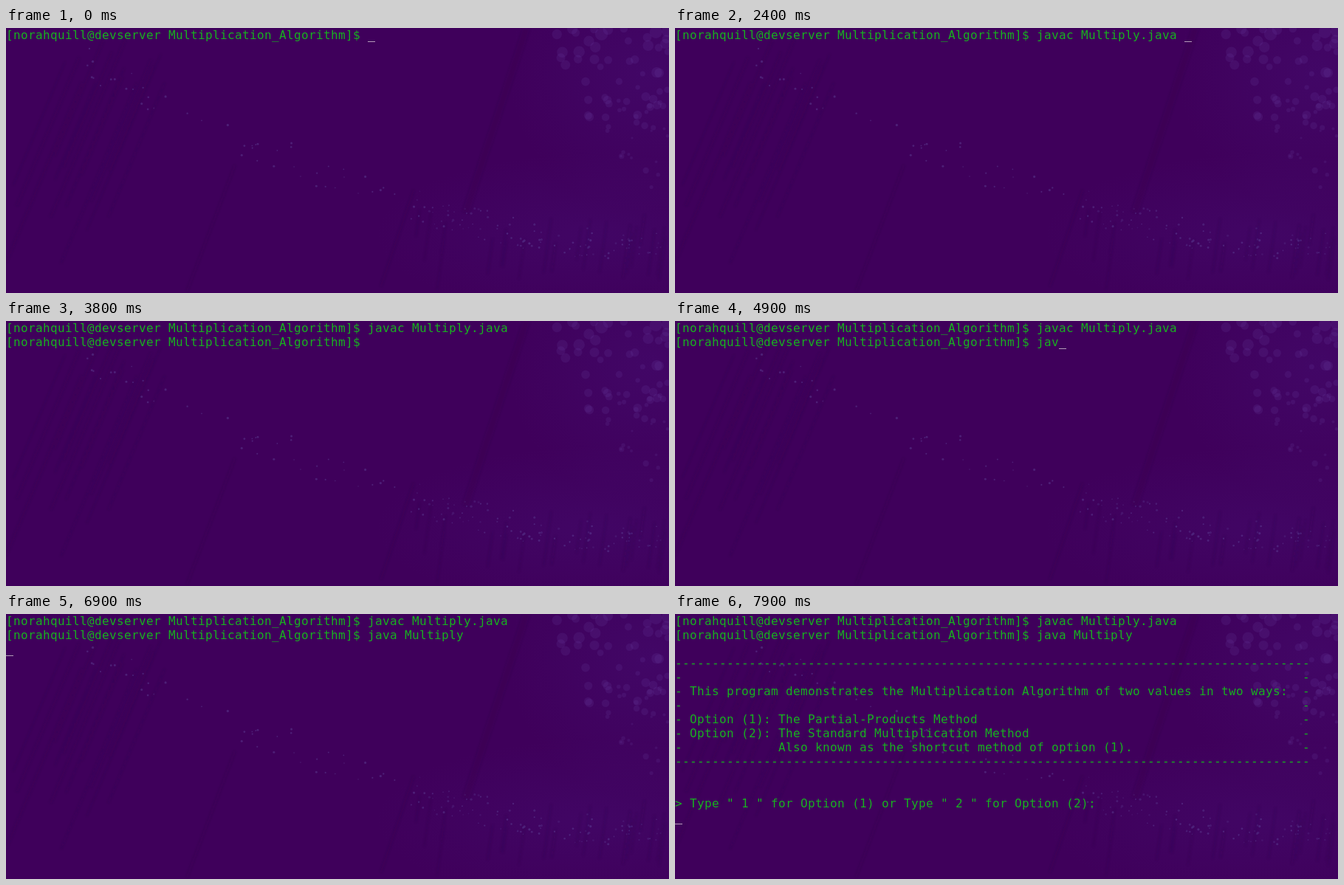
Write an HTML page that moves like this. It is 898 by 359 pixels and loops after 8 s.

```html
<!DOCTYPE html>
<html lang="en">
<head>
<meta charset="utf-8">
<title>Terminal session</title>
<style>
  html, body { margin: 0; width: 100%; height: 100%; overflow: hidden; background: #3f005b; }
  svg { display: block; width: 898px; height: 359px; }
  text { font: 16px "DejaVu Sans Mono", monospace; fill: #18b020; white-space: pre; }
</style>
</head>
<body>
<svg viewBox="0 0 898 359" xmlns="http://www.w3.org/2000/svg">
  <defs>
    <radialGradient id="glow">
      <stop offset="0" stop-color="#4c2090" stop-opacity=".3"/>
      <stop offset="1" stop-color="#4c2090" stop-opacity="0"/>
    </radialGradient>
    <filter id="soft" filterUnits="userSpaceOnUse" x="0" y="0" width="898" height="359">
      <feGaussianBlur stdDeviation="1.8"/>
    </filter>
    <filter id="edge" filterUnits="userSpaceOnUse" x="0" y="0" width="898" height="359">
      <feGaussianBlur stdDeviation=".7"/>
    </filter>
  </defs>
  <rect width="898" height="359" fill="#3f005b"/>
  <ellipse cx="870" cy="60" rx="190" ry="190" fill="url(#glow)" opacity=".7"/>
  <ellipse cx="800" cy="280" rx="300" ry="110" fill="url(#glow)" opacity=".6"/>
  <g id="streaks" filter="url(#soft)" stroke="#28003e"></g>
  <g id="bokeh" filter="url(#edge)" fill="#7a5cbc"></g>
  <g id="sparks" filter="url(#edge)" fill="#7068b8"></g>
  <g id="lines"></g>
  <rect id="cursor" width="10" height="1" fill="#b59cba"/>
</svg>
<script>
const NS = 'http://www.w3.org/2000/svg';
const $ = id => document.getElementById(id);
const COL = 10, ROW = 19, LOOP = 8000;

function add(parent, tag, attrs) {
  const el = document.createElementNS(NS, tag);
  for (const key in attrs) el.setAttribute(key, attrs[key]);
  return $(parent).appendChild(el);
}

let seed = 11;
function rnd(min = 0, max = 1) {
  seed = (seed * 16807) % 2147483647;
  return min + (max - min) * seed / 2147483647;
}

// Wallpaper: slanted streaks, a trail of sparks, bokeh in the top right corner
function streak(x, y, len, slant, width, opacity) {
  add('streaks', 'line', {
    x1: x, y1: y, x2: x - len * slant, y2: y + len, 'stroke-width': width, opacity
  });
}
const trail = x => 50 + 245 * Math.sin((x - 110) / 780 * Math.PI / 2);

function spark(x, spread, opacity) {
  add('sparks', 'circle', {
    cx: x, cy: trail(x) + rnd(-spread, spread), r: rnd(.7, 1.7), opacity
  });
}

streak(705, 0, 250, .33, 10, .12);
streak(552, 220, 130, .34, 3, .16);
streak(310, 186, 170, .38, 3, .12);
for (let i = 0; i < 14; i++) {
  streak(rnd(80, 215), rnd(10, 90), rnd(130, 250), .42, rnd(1.5, 4), .13);
}
for (let i = 0; i < 20; i++) {
  streak(rnd(560, 895), rnd(245, 295), rnd(35, 75), .14, rnd(1, 2.5), .12);
}
for (let i = 0; i < 50; i++) spark(rnd(110, 560), 24, .3);
for (let i = 0; i < 100; i++) spark(rnd(555, 895), 22, rnd(.12, .35));
for (let i = 0; i < 75; i++) {
  const y = 220 * rnd() ** 1.5;
  const cx = 898 - (175 - y * .5) * rnd() ** 1.3;
  add('bokeh', 'circle', { cx, cy: y, r: rnd(5, 9) - y / 40, opacity: .12 });
}

// Terminal text
const prompt = '[norahquill@devserver Multiplication_Algorithm]$ ';
const boxed = s => ('- ' + s).padEnd(85) + '-';
const rule = '-'.repeat(86);
const output = [
  '',
  rule,
  boxed(''),
  boxed('This program demonstrates the Multiplication Algorithm of two values in two ways:'),
  boxed(''),
  boxed('Option (1): The Partial-Products Method'),
  boxed('Option (2): The Standard Multiplication Method'),
  boxed(' '.repeat(12) + 'Also known as the shortcut method of option (1).'),
  rule,
  '',
  '',
  '> Type " 1 " for Option (1) or Type " 2 " for Option (2):',
  ''
];

const compile = prompt + 'javac Multiply.java ';
const run = prompt + 'java Multiply ';
const typeCompile = n => [compile.slice(0, prompt.length + n)];
const typeRun = n => [compile, run.slice(0, prompt.length + n)];
const full = [compile, run, ...output];

// Start time in ms and the screen lines from then on
const screens = [
  [0, typeCompile(0)], [700, typeCompile(2)], [1300, typeCompile(4)],
  [1600, typeCompile(5)], [2000, typeCompile(6)], [2200, typeCompile(7)],
  [2400, compile.split('\n')], [3500, [compile, '']],
  [3800, typeRun(0)], [4600, typeRun(2)], [4900, typeRun(3)],
  [5100, typeRun(4)], [5300, typeRun(5)], [5600, typeRun(6)],
  [5800, [compile, run]], [6900, [compile, run, '']], [7000, full]
];
// Spans in ms when the cursor is blinked off
const hidden = [[200, 500], [3700, 4300], [6400, 6700], [7300, 7900]];

const grid = Array.from({ length: 88 }, (_, i) => i * COL).join(' ');
const rows = full.map((_, i) => add('lines', 'text', { x: grid, y: 15 + i * ROW }));
const cursor = $('cursor');

function draw(t) {
  const [, screen] = screens.findLast(([start]) => start <= t);
  rows.forEach((row, i) => {
    const line = screen[i] || '';
    if (row.textContent !== line) row.textContent = line;
  });
  const last = screen.length - 1;
  const off = hidden.some(([from, to]) => t >= from && t < to);
  cursor.setAttribute('x', screen[last].length * COL);
  cursor.setAttribute('y', 18 + last * ROW);
  cursor.setAttribute('visibility', off ? 'hidden' : 'visible');
}

function tick() {
  draw(performance.now() % LOOP);
  requestAnimationFrame(tick);
}
tick();
</script>
</body>
</html>
```
